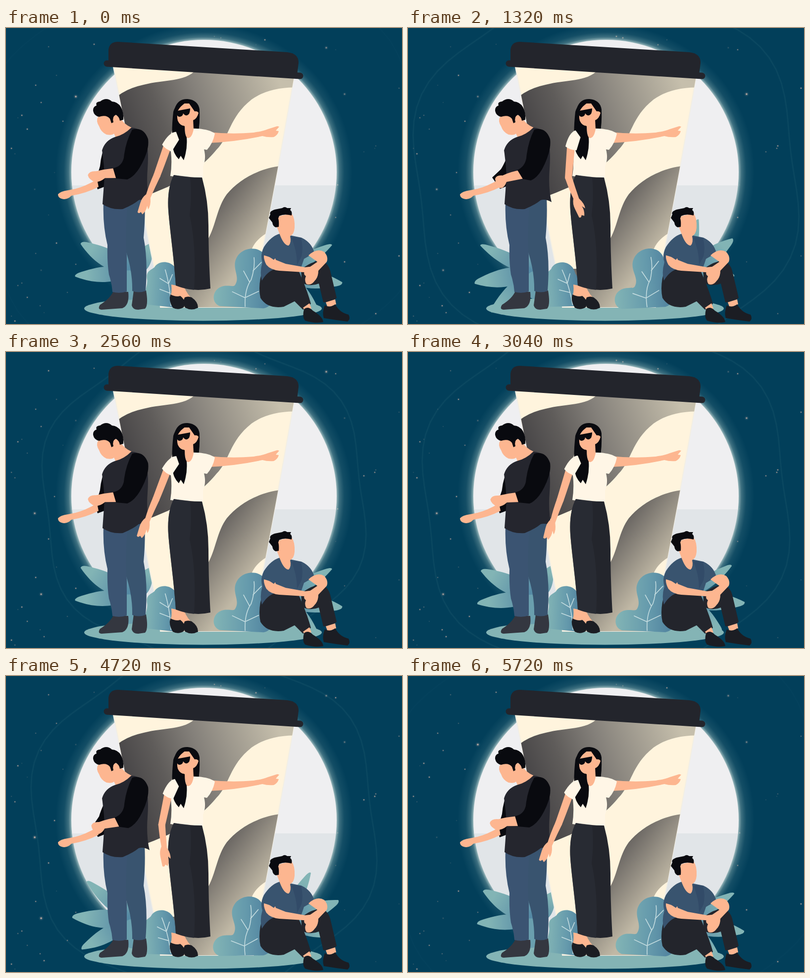
Write an HTML page that moves like this. It is 800 px wide and 600 px high and loops after 5.76 s.

```html
<!DOCTYPE html>
<html lang="en">
<head>
<meta charset="utf-8">
<title>Coffee break under the moon</title>
<style>
html, body { margin: 0; height: 100%; overflow: hidden; background: #023f5a; }
svg { display: block; width: 100vw; height: 100vh; }
.skin { fill: #fdb690; }
.ink { fill: #090a0f; }
.dark { fill: #23252c; }
.cream { fill: #fff4dd; }
.denim { fill: #39546f; }
.vein { fill: none; stroke: #c5dde0; stroke-width: 1.6; stroke-linecap: round; }
</style>
</head>
<body>
<svg viewBox="0 0 800 600">
<defs>
  <radialGradient id="halo" gradientUnits="userSpaceOnUse" cx="400" cy="292" r="300">
    <stop offset=".89" stop-color="#e4f3ec" stop-opacity=".75"/>
    <stop offset=".912" stop-color="#b5d2cd" stop-opacity=".34"/>
    <stop offset=".945" stop-color="#9bc0be" stop-opacity=".11"/>
    <stop offset="1" stop-color="#8fc4c8" stop-opacity="0"/>
  </radialGradient>
  <radialGradient id="glow">
    <stop offset="0" stop-color="#fff3ea"/>
    <stop offset=".25" stop-color="#e9b9a5" stop-opacity=".75"/>
    <stop offset=".5" stop-color="#b7a5a0" stop-opacity=".2"/>
    <stop offset="1" stop-color="#b7a5a0" stop-opacity="0"/>
  </radialGradient>
  <linearGradient id="leafFill">
    <stop offset=".1" stop-color="#558aa5"/>
    <stop offset=".8" stop-color="#82b4b5"/>
  </linearGradient>
  <linearGradient id="bushFill">
    <stop offset="0" stop-color="#82b4b5"/>
    <stop offset=".55" stop-color="#659aac"/>
    <stop offset="1" stop-color="#4d7e9c"/>
  </linearGradient>
  <linearGradient id="waveA" gradientUnits="userSpaceOnUse" x1="250" y1="250" x2="560" y2="130">
    <stop offset="0" stop-color="#454345"/>
    <stop offset=".25" stop-color="#5f5c5a"/>
    <stop offset=".5" stop-color="#84807a"/>
    <stop offset="1" stop-color="#c6bfac"/>
  </linearGradient>
  <linearGradient id="waveB" gradientUnits="userSpaceOnUse" x1="448" y1="336" x2="536" y2="402">
    <stop offset="0" stop-color="#6c6864"/>
    <stop offset="1" stop-color="#c0b8a5"/>
  </linearGradient>
  <clipPath id="moonClip"><circle cx="400" cy="292" r="268"/></clipPath>
  <clipPath id="cupClip"><path id="cupPath" d="M216 74L582 98Q556 250 518 450L500 566H312Q306 515 294 460Z"/></clipPath>
  <path id="leaf" fill="url(#leafFill)" d="M0 0C25-28 62-27 110-10Q126-5 124 2C85 20 45 25 0 0Z"/>
</defs>

<rect width="800" height="600" fill="#023f5a"/>
<path id="ring" fill="none" stroke="#4f8794" stroke-width="3"/>
<g id="stars"></g>

<circle cx="400" cy="292" r="300" fill="url(#halo)"/>
<g clip-path="url(#moonClip)">
  <rect x="130" y="20" width="540" height="300" fill="#efeff1"/>
  <rect x="130" y="319" width="540" height="250" fill="#e1e5e8"/>
</g>

<ellipse cx="398" cy="568.5" rx="240" ry="25" fill="#84b4b5"/>
<g id="leavesL">
  <use href="#leaf" transform="rotate(90) scale(-.6 .9)"/>
  <use href="#leaf" transform="rotate(37) scale(-1 .7)"/>
  <use href="#leaf" transform="rotate(-33) scale(-.93 .8)"/>
  <use href="#leaf" transform="scale(-.98 .95)"/>
  <circle cx="5" cy="22" r="30" fill="#6a9fae"/>
</g>
<g id="leavesR">
  <use href="#leaf" transform="rotate(-40) scale(.93 .65)"/>
  <use href="#leaf" transform="rotate(38) scale(.8 .7)"/>
  <use href="#leaf" transform="scale(.97 -.9)"/>
</g>

<!-- cup -->
<use href="#cupPath" class="cream" stroke="#f3efe4" stroke-width="2"/>
<g clip-path="url(#cupClip)">
  <path fill="url(#waveA)" d="M216 146Q240 123 278 115C320 104 360 110 384 85L600 80V121Q535 117 496 145C450 182 453 219 425 247C400 278 360 306 327 322Q300 334 270 345Z"/>
  <path fill="url(#waveB)" d="M560 279C510 284 470 308 446 337C426 364 424 400 408 428Q400 458 385 474Q360 490 325 488L345 580H480C492 560 483 470 497 447Q506 426 535 411Z"/>
</g>
<path class="dark" d="M207 70V44Q209 28 226 28L568 49Q592 52 591 71L588 96Z"/>
<path d="M204 72L594 97" stroke="#23252c" stroke-width="13" stroke-linecap="round"/>

<!-- bushes -->
<g id="bushL">
  <path fill="url(#bushFill)" d="M282 562C274 540 286 524 282 510C279 494 290 492 296 486C305 468 340 470 344 500C358 520 352 550 345 566Z"/>
  <path class="vein" d="M333 562Q330 525 318 490M326 518L308 508M326 518L333 499M330 537L309 530"/>
</g>
<g id="bushR">
  <path fill="url(#bushFill)" d="M432 566C412 560 415 530 438 525C452 523 458 527 461 522C470 506 457 494 459 476C464 446 500 440 515 455C530 470 520 488 525 505C548 525 545 562 520 567Z"/>
  <path class="vein" d="M483 565Q480 530 493 510Q500 485 497 465M490 515L477 493M496 492L512 474M482 547L456 536M484 546L509 533"/>
</g>

<!-- standing man -->
<path fill="#343740" d="M217 533Q211 548 190 561Q184 570 193 571L235 568Q250 562 247 535ZM258 532Q256 548 254 562Q256 571 267 571L281 569Q288 562 283 532Z"/>
<path class="denim" d="M232 355L280 343Q282 380 278 425Q287 470 282 533Q268 538 255 533Q256 495 243 455Z"/>
<path fill="#3b5472" d="M197 352Q195 400 205 440Q204 475 208 500Q214 518 215 535Q230 539 244 534V462Q240 420 246 352Z"/>
<path id="farSleeve" class="ink"/>
<path class="skin" d="M184 307Q160 321 140 326L125 329Q110 331 105 337Q105 346 118 347Q127 346 132 340Q162 335 187 322Z"/>
<path class="skin" d="M186 180Q181 188 188 199Q192 211 203 216Q215 218 218 214L224 226L238 222L254 202Q236 194 230 180Q210 170 186 180Z"/>
<path fill="#25262e" d="M220 221Q200 228 194 248Q198 275 199 300Q197 330 195 357Q212 369 236 367Q256 359 268 349Q278 346 290 353Q283 325 286 285Q290 232 276 211Q265 202 253 202Q238 217 220 221Z"/>
<path class="ink" d="M176 168Q178 178 188 180Q203 175 210 184L213 193L217 191Q214 179 222 176Q229 180 230 188L237 186Q238 170 232 160Q226 150 214 149Q203 139 190 149Q180 150 183 157Q175 160 176 168Z"/>
<path id="nearArm" class="skin"/>
<path id="nearSleeve" class="ink"/>

<!-- woman -->
<path class="skin" d="M334 520Q336 537 331 546L352 549L378 551Q366 540 360 525Z"/>
<path fill="#1b1d23" d="M332 540Q328 553 337 567Q348 573 359 566Q365 553 352 543Q344 546 332 540ZM361 546Q356 556 362 567Q375 574 388 567Q388 555 375 546Q368 543 361 546Z"/>
<path class="ink" d="M342 160Q349 143 367 144Q388 146 391 165Q392 195 388 213Q381 220 376 210L365 220L340 216Q336 185 342 160Z"/>
<path class="skin" d="M410 211Q455 216 500 212Q520 209 529 205L548 199L552 200L545 208L551 209Q549 217 541 221Q528 222 518 219Q465 231 408 233Z"/>
<path fill="#fff6e6" d="M336 207L360 203L388 204Q412 206 422 214Q418 234 406 247L400 246Q405 265 398 281V304Q362 305 332 300Q336 275 333 250L322 245Z"/>
<path class="dark" d="M339 298Q365 303 396 303Q409 350 409 400Q409 460 413 528Q380 536 343 522C340 470 331 410 328 370Q325 325 339 298Z"/>
<path fill="#2b2e37" opacity=".7" d="M339 298L372 302Q376 340 371 380Q385 440 380 531Q360 529 343 522C340 470 331 410 328 370Q325 325 339 298Z"/>
<path class="skin" d="M358 190Q362 213 364 222Q375 227 379 205L378 185Z"/>
<path class="skin" d="M347 163Q344 176 347 188Q353 201 366 198Q373 194 378 187Q386 184 389 172Q386 168 381 169L370 153L356 153Z"/>
<path class="ink" d="M338 170Q343 150 365 150Q352 158 347 168Q343 188 351 198Q357 197 361 199Q361 216 365 222Q367 245 359 268L353 259L349 266Q341 258 338 247Q333 215 338 170Z"/>
<path class="ink" d="M345 168Q344 179 350 180Q357 180 358 173Q361 178 366 177Q372 175 372 163Z"/>
<g id="upperArm">
  <path class="skin" d="M322 228L338 228Q338 270 337 303A7 7 0 0 1 323 303Z"/>
  <g id="foreArm">
    <path class="skin" d="M323 302Q324 328 327 347Q322 357 324 368L327 387Q331 390 333 384L338 387Q342 377 339 367L344 373Q346 364 338 350Q337 325 337 302Z"/>
  </g>
  <path fill="#fff6e6" d="M337 207Q324 212 319 241Q329 248 342 247L348 220Z"/>
</g>

<!-- sitting man -->
<path class="dark" d="M596 490Q620 470 641 473Q651 478 655 492L668 547Q658 557 641 556L632 518Q615 525 598 517Z"/>
<path class="dark" d="M520 484Q508 520 514 547Q528 570 561 565L583 554L600 571L616 559Q608 530 592 494Z"/>
<path class="skin" d="M600 567L613 558L617 568L605 574ZM646 556L665 550L667 560L650 567Z"/>
<path fill="#1b1d23" d="M602 570Q598 586 604 593Q625 600 641 596Q640 585 620 573Q610 563 602 570ZM644 562Q638 577 642 588Q665 592 690 595Q697 590 692 581Q674 577 665 560Q655 568 644 562Z"/>
<path class="denim" d="M553 417Q535 422 521 444Q513 460 518 475Q512 495 517 512Q530 490 548 488Q575 497 596 486L602 468L623 456Q618 435 597 425L573 420Z"/>
<path fill="#324b68" d="M576 424L596 425Q601 445 597 463L588 480Q588 450 576 424Z"/>
<path class="skin" d="M611 461Q628 445 643 454Q652 464 648 474L631 492Q631 505 624 512Q616 523 607 519Q602 512 606 503Q598 498 607 489L629 474Z"/>
<path class="skin" d="M524 452Q517 463 526 480Q534 490 552 492L601 495Q618 500 626 493Q633 486 622 483L604 485L565 478L545 470Q541 456 538 448Z"/>
<path class="denim" d="M522 446Q530 430 545 425L550 460L541 470Q531 462 517 460Z"/>
<path class="skin" d="M546 400L554 421Q562 441 571 441Q577 435 574 422Q582 418 583 405Q584 385 577 376L553 381Q545 390 546 400Z"/>
<path class="ink" d="M545 404Q539 402 538 394L531 385L534 378Q531 372 543 368L558 365Q563 361 568 365L576 365L574 369Q579 372 577 380Q562 376 552 381L550 386Q552 392 551 403Z"/>
</svg>
<script>
const LOOP = 5760, SWAY = 2880, RIPPLE = 1920;
const $ = id => document.getElementById(id);
const set = (id, name, value) => $(id).setAttribute(name, value);
const turn = (id, angle, x, y) => set(id, 'transform', `rotate(${angle} ${x} ${y})`);
const wave = (t, lead) => Math.cos((t + lead) / SWAY * 2 * Math.PI);

// Blend two paths that share the same commands.
function mix(a, b, k) {
  const ends = b.match(/[\d.]+/g);
  let i = 0;
  return a.replace(/[\d.]+/g, n => +n + (ends[i++] - n) * k);
}

const poses = {
  farSleeve: ['M200 238 Q192 256 190 280 L181 312 L185 327 L201 321 Z',
              'M200 262 Q190 284 187 287 L170 303 L186 326 L201 320 Z'],
  nearArm: ['M220 284 Q200 286 182 290 Q168 289 165 298 Q167 307 180 312 Q190 312 200 304 L224 304 Z',
            'M228 288 Q207 291 191 299 Q178 298 176 306 Q177 315 184 324 Q194 327 199 312 L234 305 Z'],
  nearSleeve: ['M255 206 Q278 200 287 225 Q290 245 275 274 Q262 300 245 307 L222 305 L216 284 Q234 281 238 263 Q241 232 255 206 Z',
               'M255 206 Q278 200 287 225 Q290 245 276 276 Q264 303 248 309 L232 306 L221 288 Q236 281 239 264 Q242 232 255 206 Z']
};

// x, y of each star
const spots = [86,38, 178,33, 421,17, 523,24, 647,40, 666,44, 102,96, 60,116, 71,151, 141,139,
  684,134, 794,122, 24,182, 32,177, 11,244, 18,255, 58,327, 98,293, 747,239, 723,251, 86,379,
  666,384, 670,318, 102,436, 60,457, 71,491, 141,479, 684,474, 794,462, 24,522, 32,517, 11,584,
  18,594, 747,579, 69,563, 77,577, 43,546, 434,20, 505,34, 115,189, 43,205, 745,244, 124,536];
const bright = [4, 9, 10, 16, 25];
const stars = [];
for (let i = 0; i < spots.length; i += 2) {
  const [x, y] = spots.slice(i, i + 2);
  const star = document.createElementNS('http://www.w3.org/2000/svg', 'circle');
  star.setAttribute('cx', x);
  star.setAttribute('cy', y);
  star.setAttribute('fill', 'url(#glow)');
  $('stars').append(star);
  stars.push({ star, size: bright.includes(i / 2) ? 4.5 : 2.6, phase: x * 1.7 + y * .9 });
}

function ringPath(r) {
  let d = '';
  for (let a = 0; a < 360; a += 4) {
    const q = r * (1 + .04 * Math.cos((a - 203) * Math.PI / 30)), rad = a * Math.PI / 180;
    d += `${d ? 'L' : 'M'}${400 + q * Math.cos(rad)} ${300 + q * Math.sin(rad)}`;
  }
  return d + 'Z';
}

function draw(now) {
  const t = now % LOOP, c = wave(t, 160);

  const upper = 12.5 + 8.5 * wave(t, 280), fore = 5 + 22 * wave(t, 150);
  turn('upperArm', upper, 330, 228);
  turn('foreArm', fore - upper, 330, 303);
  for (const id in poses) set(id, 'd', mix(...poses[id], (1 - c) / 2));

  set('leavesL', 'transform', `translate(255 500) rotate(${12.5 + 20.5 * c})`);
  set('leavesR', 'transform', `translate(560 500) rotate(${-13.7 + 23.3 * c})`);
  turn('bushL', -1 + 4 * c, 320, 566);
  turn('bushR', -.5 + 3 * c, 490, 567);

  const p = (t - 160 + RIPPLE) % RIPPLE / RIPPLE;
  set('ring', 'd', ringPath(285 + 177 * p));
  set('ring', 'opacity', .1 * Math.min(1, p * 8, (1 - p) * 3));

  for (const { star, size, phase } of stars) {
    const k = .5 + .5 * Math.cos(t / LOOP * 6 * Math.PI + phase);
    star.setAttribute('r', size * (.7 + .5 * k));
    star.setAttribute('opacity', .25 + .6 * k);
  }
}

const start = performance.now();
function tick() {
  draw(performance.now() - start);
  requestAnimationFrame(tick);
}
tick();
</script>
</body>
</html>
```
